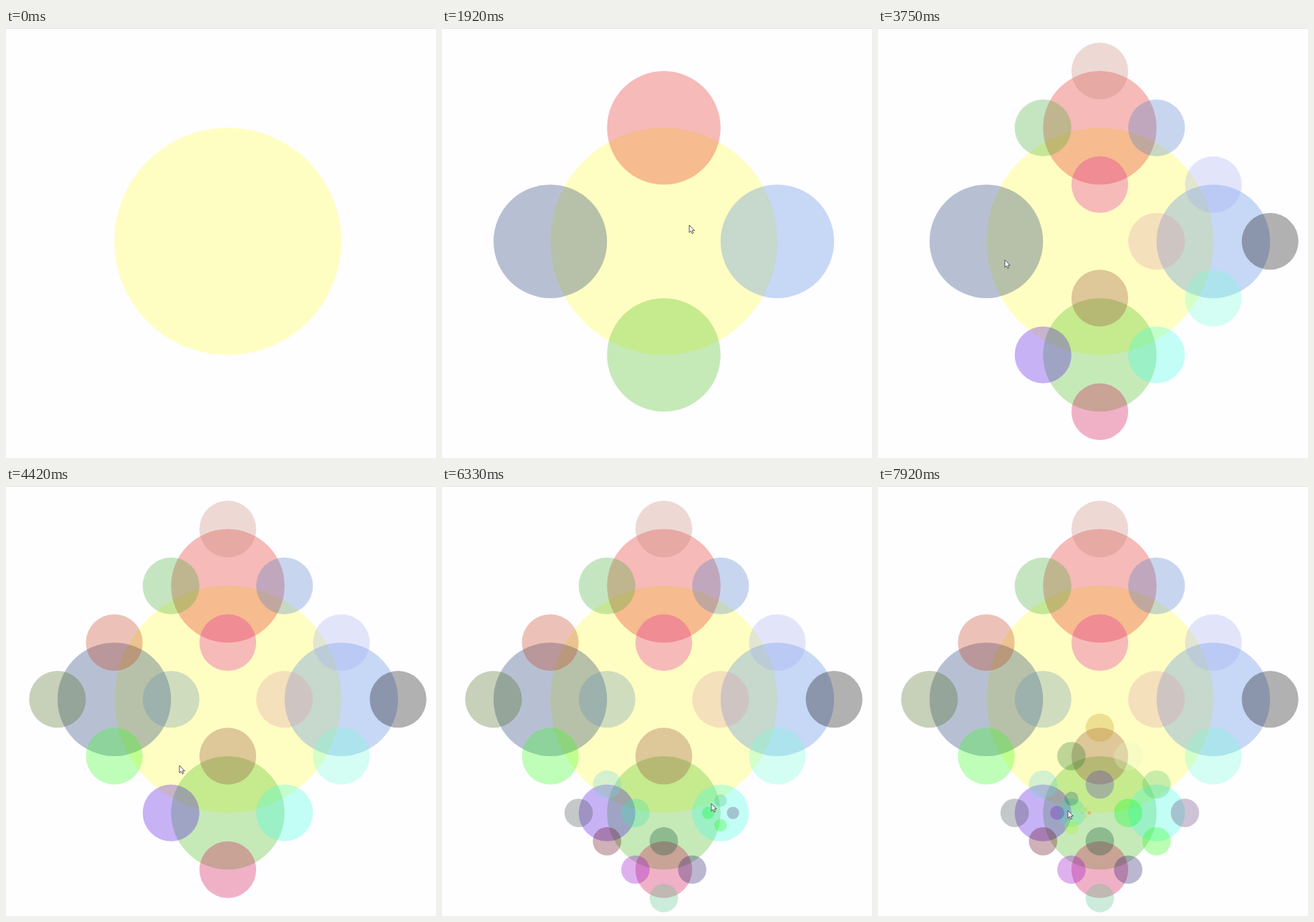
An HTML page with a canvas that plays this animation: 600 px wide and 600 px high, repeating every 8 s.

```html
<!DOCTYPE html>
<html lang="en">
<head>
<meta charset="utf-8">
<title>Splitting circles</title>
<style>
  html, body { margin: 0; width: 100%; height: 100%; overflow: hidden; background: #fefdff; }
  canvas { display: block; width: 600px; height: 600px; }
</style>
</head>
<body>
<canvas id="stage" width="600" height="600"></canvas>
<script>
const ctx = document.getElementById('stage').getContext('2d');
const LOOP = 8000;
const GROW = 240;
const ROOT = { x: 309.5, y: 297.7, r: 158.4 };
const DIRECTIONS = { T: [0, -1], R: [1, 0], B: [0, 1], L: [-1, 0] };

const smooth = u => u * u * (3 - 2 * u);
const mix = (a, b, u) => a + (b - a) * u;

// A child slides out of its parent's centre to the rim, growing to half its radius.
function childOf(parent, direction, grown = 1) {
  const [dx, dy] = DIRECTIONS[direction];
  const reach = parent.r * grown;
  return { x: parent.x + dx * reach, y: parent.y + dy * reach, r: reach / 2 };
}

// Each click splits the circle found along a path; colours run top, right, bottom, left.
const clicks = [
  [1400, '', '#e12014 #487de1 #44b914 #12346e'],
  [2440, 'T', '#c38070 #487ac6 #e120a0 #41ac34'],
  [3120, 'R', '#9eacee #000000 #70ffd7 #de98ad'],
  [3460, 'B', '#914835 #3affe1 #cd0048 #4805e1'],
  [3850, 'L', '#c03a14 #628eb4 #2dff19 #486914'],
  [5020, 'BB', '#104e34 #201469 #55c384 #9100c6'],
  [5740, 'BL', '#6ed2e6 #3ce1aa #620014 #414e4e'],
  [6220, 'BR', '#4bc46e #5c3a76 #20ff05 #00ff20'],
  [6650, 'BT', '#c69821 #e1f5c8 #5838b8 #26762f'],
  [7360, 'BLR', '#286478 #c8e6a0 #aaff28 #7814be'],
  [7800, 'BLRR', '#b0d840 #ff5000 #a0e060 #60e0a0']
].map(([time, path, colors]) => ({
  time,
  circle: [...path].reduce((circle, step) => childOf(circle, step), ROOT),
  colors: colors.split(' ')
}));

// The pointer visits every clicked circle, with a few resting points in between.
const stops = [
  { time: 500, x: 600, y: 215 },
  { time: 1920, x: 345, y: 275 },
  { time: 3080, x: 476, y: 309 },
  { time: 4420, x: 242, y: 390 },
  { time: 5670, x: 226, y: 473 },
  { time: 7000, x: 296, y: 428 },
  { time: 7920, x: 265, y: 453 },
  { time: LOOP, x: 265, y: 453 },
  ...clicks.map(({ time, circle }) => ({ time, x: circle.x, y: circle.y }))
].sort((a, b) => a.time - b.time);

function drawCircle({ x, y, r }, color) {
  ctx.globalAlpha = 0.3;
  ctx.fillStyle = color;
  ctx.beginPath();
  ctx.arc(x, y, r, 0, 2 * Math.PI);
  ctx.fill();
  ctx.globalAlpha = 1;
}

function drawSplit({ time: start, circle, colors }, time) {
  if (time <= start) return;
  const grown = smooth(Math.min(1, (time - start) / GROW));
  Object.keys(DIRECTIONS).forEach((direction, i) =>
    drawCircle(childOf(circle, direction, grown), colors[i]));
}

const ARROW = new Path2D('M0 0V10.4L2.4 8.2 4 11.8 5.7 11 4.2 7.5H7.3Z');

function drawPointer(time) {
  const next = stops.findIndex(stop => stop.time > time);
  if (next < 1) return;
  const from = stops[next - 1], to = stops[next];
  const u = smooth((time - from.time) / (to.time - from.time));
  ctx.save();
  ctx.translate(mix(from.x, to.x, u), mix(from.y, to.y, u));
  ctx.fillStyle = '#fff';
  ctx.strokeStyle = '#444';
  ctx.lineWidth = 0.9;
  ctx.fill(ARROW);
  ctx.stroke(ARROW);
  ctx.restore();
}

function draw(time) {
  ctx.fillStyle = '#fefdff';
  ctx.fillRect(0, 0, 600, 600);
  ctx.fillStyle = '#e4e4e6';
  ctx.fillRect(0, 0, 600, 1);
  drawCircle(ROOT, '#ffff35');
  clicks.forEach(click => drawSplit(click, time));
  drawPointer(time);
}

let begin;
function tick(now) {
  begin ??= now;
  draw((now - begin) % LOOP);
  requestAnimationFrame(tick);
}
draw(0);
requestAnimationFrame(tick);
</script>
</body>
</html>
```
